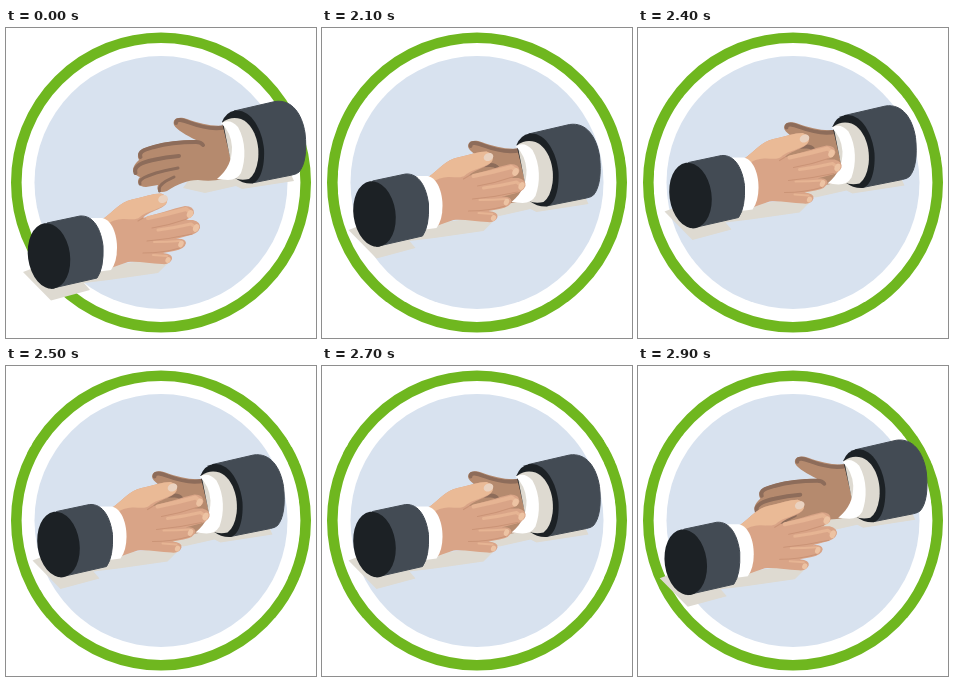
Recreate the animation shown at these times as an HTML page. Size 310 px wide and 310 px high, loop 3000 ms.

```html
<!DOCTYPE html>
<html lang="en">
<head>
<meta charset="utf-8">
<title>Handshake</title>
<style>
  html, body { margin: 0; height: 100%; overflow: hidden; background: #fff; }
  svg { display: block; width: 100vw; height: 100vh; }
  .shade { fill: #dedad1; }
  .cloth { fill: #434b54; stroke: #434b54; }
  .dark { fill: #1c2125; }
  .cuff { fill: #fff; }
  .line { fill: none; stroke-linecap: round; stroke-linejoin: round; }
</style>
</head>
<body>
<svg viewBox="0 0 310 310">
  <circle cx="155" cy="154.500" r="144.700" fill="#fff" stroke="#6fb71f" stroke-width="10.600"/>
  <circle cx="155" cy="154.500" r="126.500" fill="#d8e2ef"/>

  <path class="right shade" d="M184 150L177 160L199 165L230 158L236 161L288 153L283 142Z"/>
  <path class="left shade" d="M17 244L30 239L100 238L157 230L164 233L152 245L103 252L78 255L84 262L45 272.500Z"/>

  <g class="right">
    <path fill="#b58a6e" d="M222 97C207 99 195 96 181 91C172 88 166 91 168 97C171 102 180 107 190 112
      C172 112 157 114 142 119C133 121 130 127 133 132C127 137 125 143 130 147Q133 149 134 149
      C130 153 132 159 140 159L152 157C150 162 153 166 161 163C172 156 181 152 192 152Q205 154 217 151L231 125Z"/>
    <path class="line" stroke="#8d6c5a" stroke-width="4" d="M170 95C170 90 177 92 183 94.500C195 99 208 102 220 99
      M134.500 129C132 123 141 121 148 119C162 115 176 114 190 114Q195 114 197 117
      M129.500 145C127 138 137 134 147 132Q160 129 173 128"/>
    <path class="line" stroke="#8d6c5a" stroke-width="3" d="M134 156C132 151 141 148 150 145Q161 142 172 140
      M153.500 163Q152 158 160 153L168 149"/>
    <path class="cloth" d="M228 83L269 73.500C286 71 296 86 299 105C301 123 299 137 293 144Q291 146 286 147L246 155Z"/>
    <path class="dark" d="M216 94Q220 84 229 82.500C245 81 256 101 258 121C259 139 254 154 246 155.500Q237 156 229 150Z"/>
    <path class="shade" d="M217 94Q225 88 235 91C249 97 254 117 252 132Q250 146 243 151Q235 153 228 150Z"/>
    <path class="cuff" d="M215 95Q224 90 232 99C240 113 240 132 235 145Q231 152 222 152L211 151C222 142 226 132 226 119Q225 104 215 95Z"/>
  </g>

  <g class="left">
    <path fill="#d9a487" d="M97 191C108 183 114 174 126 171.500C138 169 147 165.500 155 165.500Q163 168 161 174C159 181 143 183 137 190
      C151 186 166 181 179 178Q188 178 188 185Q187 190 178 192L187 192Q195 194 194 200Q192 206 181 208
      L170 211Q179 210 180 215Q179 221 168 223L157 225Q167 226 166 231Q164 237 156 236
      C144 236 133 233 122 234Q113 237 105 240Z"/>
    <path fill="#eaba96" d="M97 191C108 183 114 174 126 171.500C138 169 147 165.500 155 165.500Q163 168 161 174
      C158 181 140 183 134 189C127 195 117 186 101 196Z"/>
    <g class="line" stroke="#e6b493" stroke-width="4">
      <path d="M142 190Q162 186 180 181L184 184"/>
      <path d="M152 202Q168 200 185 196L189 199" stroke-width="3"/>
      <path d="M148 214Q162 214 174 213" stroke-width="2"/>
      <path d="M147 227L161 228" stroke-width="2"/>
    </g>
    <path class="line" stroke="#cb9477" stroke-width="1.200" d="M137 190L132 193M146 200Q164 197 181 191M141 213Q164 211 186 206M137 225Q157 225 174 220"/>
    <ellipse cx="157" cy="171" rx="5" ry="3.800" transform="rotate(-25 157 171)" fill="#ead2c0"/>
    <g fill="#edc3a3">
      <ellipse cx="184" cy="186" rx="3" ry="4" transform="rotate(25 184 186)"/>
      <ellipse cx="190" cy="200" rx="2.800" ry="4" transform="rotate(25 190 200)"/>
      <ellipse cx="175" cy="216" rx="2.500" ry="3.500" transform="rotate(25 175 216)"/>
      <ellipse cx="162" cy="232" rx="2.500" ry="3" transform="rotate(25 162 232)"/>
    </g>
    <path class="cuff" d="M80 190L96 190C106 192 111 206 111 220Q111 234 105 242L90 244Z"/>
    <path class="cloth" d="M41 195L74 188C88 187 95 202 97 218Q98 240 91 250L45 260.500Z"/>
    <ellipse class="dark" cx="43" cy="228" rx="21" ry="33" transform="rotate(-8 43 228)"/>
  </g>
</svg>
<script>
  const LOOP = 3000, REST = 1900, STEP = 100, LAST = 10;
  const REACH = { left: [9.5, -32.5], right: [-21.5, 32.5] };

  // How far the hands have met, from 0 (apart) to 1 (clasped)
  const grip = n => Math.min(1, n / 2, (LAST + 1 - n) / 2);

  // Upward shift of both arms: rising, shaking on every step, letting go
  function lift(n) {
    if (n < 3) return n * 4.75;
    if (n === LAST) return 15.5;
    return n % 2 ? 28 : 17;
  }

  function move(side, close, up) {
    const [x, y] = REACH[side];
    for (const el of document.querySelectorAll("." + side))
      el.setAttribute("transform", `translate(${x * close} ${y * close - up})`);
  }

  function draw() {
    const n = Math.max(0, Math.floor((performance.now() % LOOP - REST) / STEP));
    const close = grip(n), up = lift(n);
    move("left", close, up);
    move("right", close, up);
    requestAnimationFrame(draw);
  }
  draw();
</script>
</body>
</html>
```
